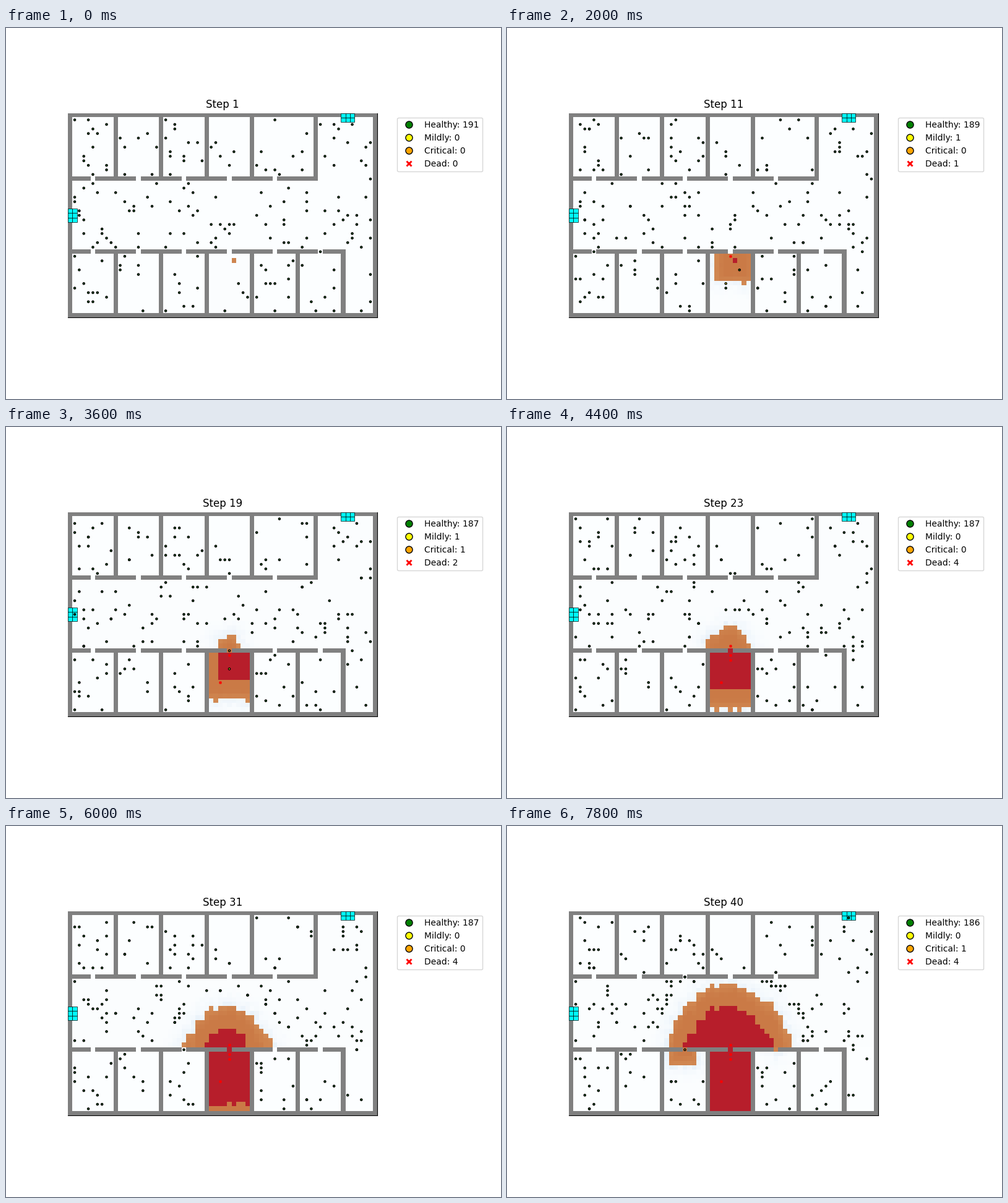
Animation of 800x600 px, one loop 8 s. Source, as a matplotlib script:

```python
import numpy as np
import matplotlib.pyplot as plt
from matplotlib.animation import FuncAnimation
from matplotlib.lines import Line2D
from matplotlib.patches import Rectangle

COLS, ROWS, STEPS = 68, 45, 40
PEOPLE = 186
BURN_TIME = 9
rng = np.random.default_rng(12)
yy, xx = np.mgrid[0:ROWS, 0:COLS]

# ---------- floor plan ----------
wall = np.zeros((ROWS, COLS), bool)
wall[[0, -1], :] = True
wall[:, [0, -1]] = True
wall[14, :55] = True
wall[30, :61] = True
wall[:15, 10:41:10] = True
wall[:15, 54] = True
wall[30:, 10:61:10] = True
wall[14, 5:46:10] = False
wall[30, 5:56:10] = False

# zones keep smoke and fear from leaking through walls
zone = np.where(yy < 30, -1, xx // 10)
zone[(yy < 15) & (xx < 55)] = -2

# ---------- fire arrival time of every cell ----------
noise = rng.uniform(-1, 1, (ROWS, COLS))
ragged = rng.uniform(-1, 1, COLS)


def fire_arrival():
    when = np.full((ROWS, COLS), 999.0)

    # the burning room: slow towards the door, faster downwards
    dx, dy = np.abs(xx - 36), yy - 32
    spread = np.maximum(2.4 * dx, np.where(dy < 0, -6.3 * dy, 2.05 * dy))
    room = zone == 3
    when[room] = (1 + spread + 0.8 * noise * (spread > 0))[room]

    # a rounded front that grows into the corridor
    front = (np.abs(xx - 34.6) ** 1.6 + np.abs(29.5 - yy) ** 1.6) ** (1 / 1.6)
    hall = zone == -1
    when[hall] = (13.5 + front / 0.53 + 1.3 * ragged + 0.4 * noise)[hall]

    # neighbouring rooms catch fire through their doors
    for col, start in ((24.6, 33), (45, 39.5)):
        reach = np.maximum(2.3 * np.abs(xx - col), 2 * (yy - 30))
        room = zone == col // 10
        when[room] = (start + reach)[room]

    when[wall] = 999
    return when


arrival = fire_arrival()


def fire_distance(t):
    """Distance of every cell to the nearest fire in its own zone."""
    dist = np.full((ROWS, COLS), np.inf)
    burning = arrival <= t
    for z in np.unique(zone[burning]):
        here = zone == z
        fy, fx = np.nonzero(burning & here)
        gap = np.hypot(yy[here][:, None] - fy, xx[here][:, None] - fx)
        dist[here] = gap.min(axis=1)
    return dist


distance = [fire_distance(t) for t in range(STEPS + 1)]

# ---------- people ----------
# start cell, end cell, step of arrival, step of first injury, step of death
VICTIMS = [
    ((37, 37), (35, 31), 11, 6, 11),
    ((38, 39), (33, 37), 13, 10, 13),
    ((39, 40), (35, 29), 20, 14, 20),
    ((34, 43), (35, 32), 22, 18, 22),
    ((25, 26), (25, 30), 34, 35, 99),
]
MOVES = [(a, b) for a in (-1, 0, 1) for b in (-1, 0, 1) if a or b]


def victim(t, start, end, arrive, hurt, death):
    """Cell and state (0 healthy, 1 mild, 2 critical, 3 dead) at a step."""
    part = min((t - 1) / (arrive - 1), 1)
    cell = [round(a + (b - a) * part) for a, b in zip(start, end)]
    return cell, sum(t >= turn for turn in (hurt, hurt + 2, death))


def wander(c, r, t):
    """One step of a random walk that shies away from the fire."""
    near = distance[t][r, c] < 4
    if not near and rng.random() < 0.5:
        return c, r
    options = [(c + a, r + b) for a, b in MOVES
               if not wall[r + b, c + a] and arrival[r + b, c + a] > t
               and (c + a, r + b) != (35, 30)]
    if not options:
        return c, r
    if near:
        options.append((c, r))
        return max(options, key=lambda p: distance[t][p[1], p[0]]
                   + 0.4 * rng.random())
    return options[rng.integers(len(options))]


def simulate():
    cells = np.argwhere(~wall & (zone != 3))
    chosen = rng.choice(len(cells), PEOPLE, replace=False)
    history = [[(int(c), int(r)) for r, c in cells[chosen]]]
    for t in range(2, STEPS + 1):
        history.append([wander(c, r, t) for c, r in history[-1]])
    return history


history = simulate()

# ---------- picture ----------
FLOOR = np.array([252, 254, 255]) / 255
SMOKE = np.array([205, 224, 243]) / 255
FLAME_NEW = np.array([211, 140, 85]) / 255
FLAME_OLD = np.array([202, 122, 70]) / 255
BURNT = np.array([183, 30, 43]) / 255


def floor_image(t):
    haze = 0.5 * np.exp(-0.7 * distance[t]) * (1 + 0.5 * noise)
    haze *= min(t / 15, 1)
    img = FLOOR + (SMOKE - FLOOR) * haze[..., None]
    age = np.clip((t - arrival + 1 + noise) / 5, 0, 1)[..., None]
    flame = FLAME_NEW + (FLAME_OLD - FLAME_NEW) * age
    burning = arrival <= t
    img[burning] = flame[burning]
    img[arrival + BURN_TIME <= t] = BURNT
    img[wall] = 128 / 255
    return img


fig, ax = plt.subplots(figsize=(8, 6), dpi=100)
fig.subplots_adjust(left=0.125, right=0.75, bottom=0.11, top=0.88)
ax.set_xticks([])
ax.set_yticks([])
ax.spines[["left", "top"]].set_visible(False)
ax.spines[["right", "bottom"]].set_zorder(4)

picture = ax.imshow(floor_image(1), extent=(0, COLS, ROWS, 0),
                    interpolation="nearest", zorder=2)
for left, top, wide, high in ((60, 0, 3, 2), (0, 21, 2, 3)):
    for c in range(left, left + wide):
        for r in range(top, top + high):
            ax.add_patch(Rectangle((c, r), 1, 1, facecolor="cyan",
                                   edgecolor="black", linewidth=0.5, zorder=3))
alive = ax.scatter([], [], s=5, edgecolors="black", linewidths=1, zorder=5)
dead = ax.scatter([], [], s=5, marker="X", color="red", linewidths=1, zorder=5)
title = ax.set_title("Step 1")

NAMES = ["Healthy", "Mildly", "Critical", "Dead"]
COLORS = ["green", "yellow", "orange", "red"]


def key(name, color):
    marker, edge = ("X", "w") if name == "Dead" else ("o", "black")
    return Line2D([0], [0], color="w", marker=marker, markersize=8,
                  markerfacecolor=color, markeredgecolor=edge)


legend = ax.legend([key(*pair) for pair in zip(NAMES, COLORS)],
                   ["Healthy: 191"] + [f"{name}: 0" for name in NAMES[1:]],
                   loc="upper left", bbox_to_anchor=(1.05, 1))


def draw(frame):
    t = frame + 1
    hurt = [victim(t, *v) for v in VICTIMS]
    spots = np.array(history[frame] + [cell for cell, _ in hurt]) + 0.5
    states = np.array([0] * PEOPLE + [state for _, state in hurt])

    picture.set_data(floor_image(t))
    living = states < 3
    alive.set_offsets(spots[living])
    alive.set_facecolors([COLORS[s] for s in states[living]])
    dead.set_offsets(spots[~living])
    title.set_text(f"Step {t}")
    for i, text in enumerate(legend.get_texts()):
        text.set_text(f"{NAMES[i]}: {np.sum(states == i)}")
    return picture, alive, dead, title


anim = FuncAnimation(fig, draw, frames=STEPS, interval=200, repeat=True,
                     repeat_delay=0)
plt.show()
```
